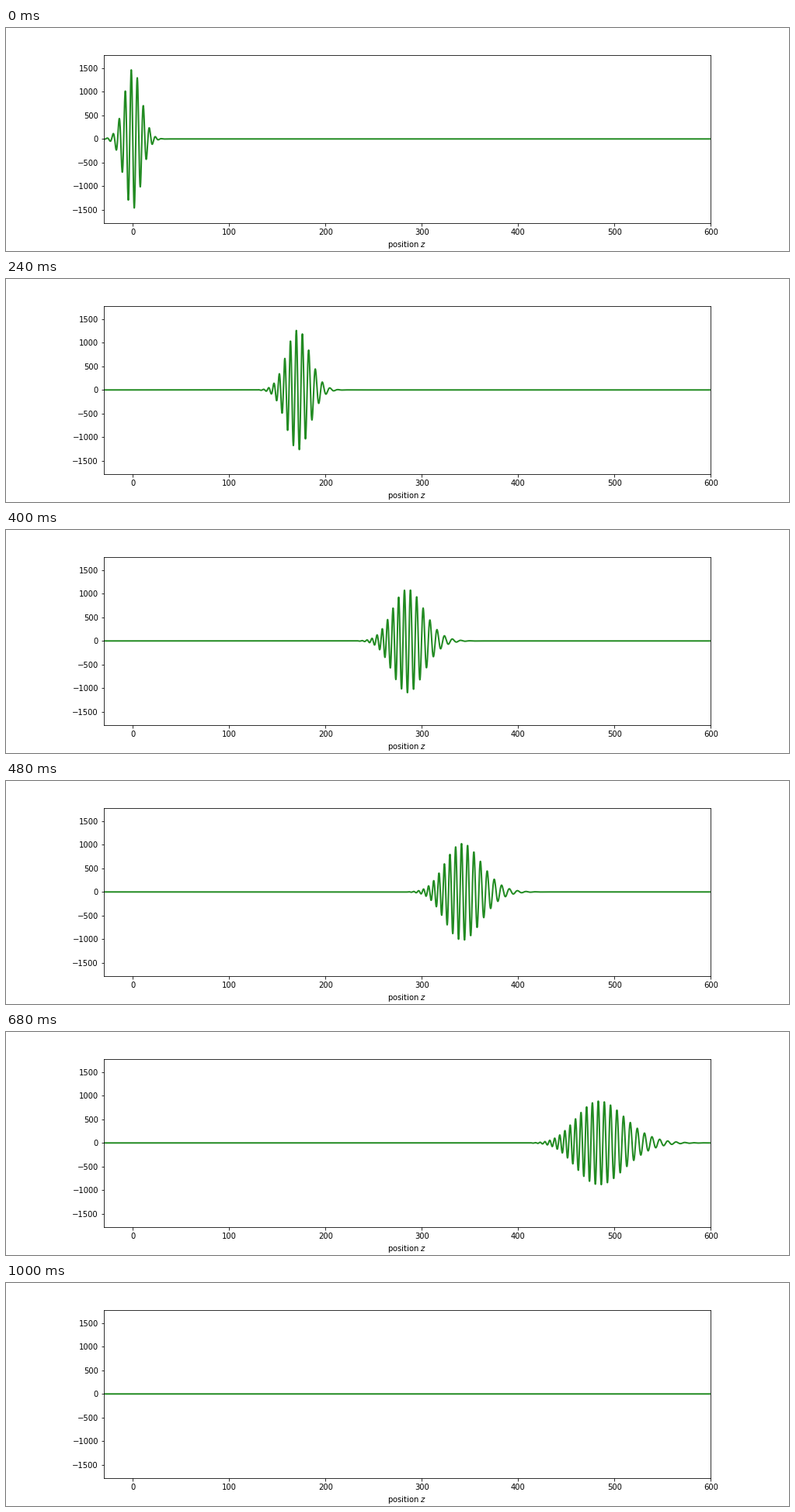
A matplotlib script that plays this animation: 1008 by 288 pixels, repeating every 1.2 s.

```python
import numpy as np
import matplotlib.pyplot as plt
from matplotlib.animation import FuncAnimation

FRAMES, INTERVAL = 30, 40
AMPLITUDE = 1485
WIDTH = np.sqrt(80)            # initial width of the packet

# Dispersion per frame: phase, group velocity and its first two derivatives
PHASE, SPEED, CHIRP, SKEW = 29.664, 28.571, -12.4, 16.0

z = np.linspace(-30, 600, 5000)
dk = np.arange(-0.6, 0.6, 0.003)
weight = np.exp(-(dk * WIDTH) ** 2 / 2)
weight *= AMPLITUDE / weight.sum()
omega = PHASE + SPEED * dk + CHIRP * dk**2 / 2 + SKEW * dk**3 / 6
waves = np.exp(1j * np.outer(z, 1 + dk))


def packet(step):
    return -(waves @ (weight * np.exp(-1j * omega * step))).imag


plt.rcParams["font.family"] = "DejaVu Sans"
plt.rcParams["font.size"] = 10
fig, ax = plt.subplots(figsize=(14, 4), dpi=72)
fig.subplots_adjust(left=0.125, right=0.9, bottom=0.125, top=0.88)
ax.set_xlim(-30, 600)
ax.set_ylim(-1.2 * AMPLITUDE, 1.2 * AMPLITUDE)
ax.set_xlabel("position $z$")
line, = ax.plot(z, packet(0), color="forestgreen", lw=2)


def update(step):
    line.set_ydata(packet(step))
    return line,


anim = FuncAnimation(fig, update, frames=FRAMES, interval=INTERVAL,
                     repeat=True, repeat_delay=0)
plt.show()
```
